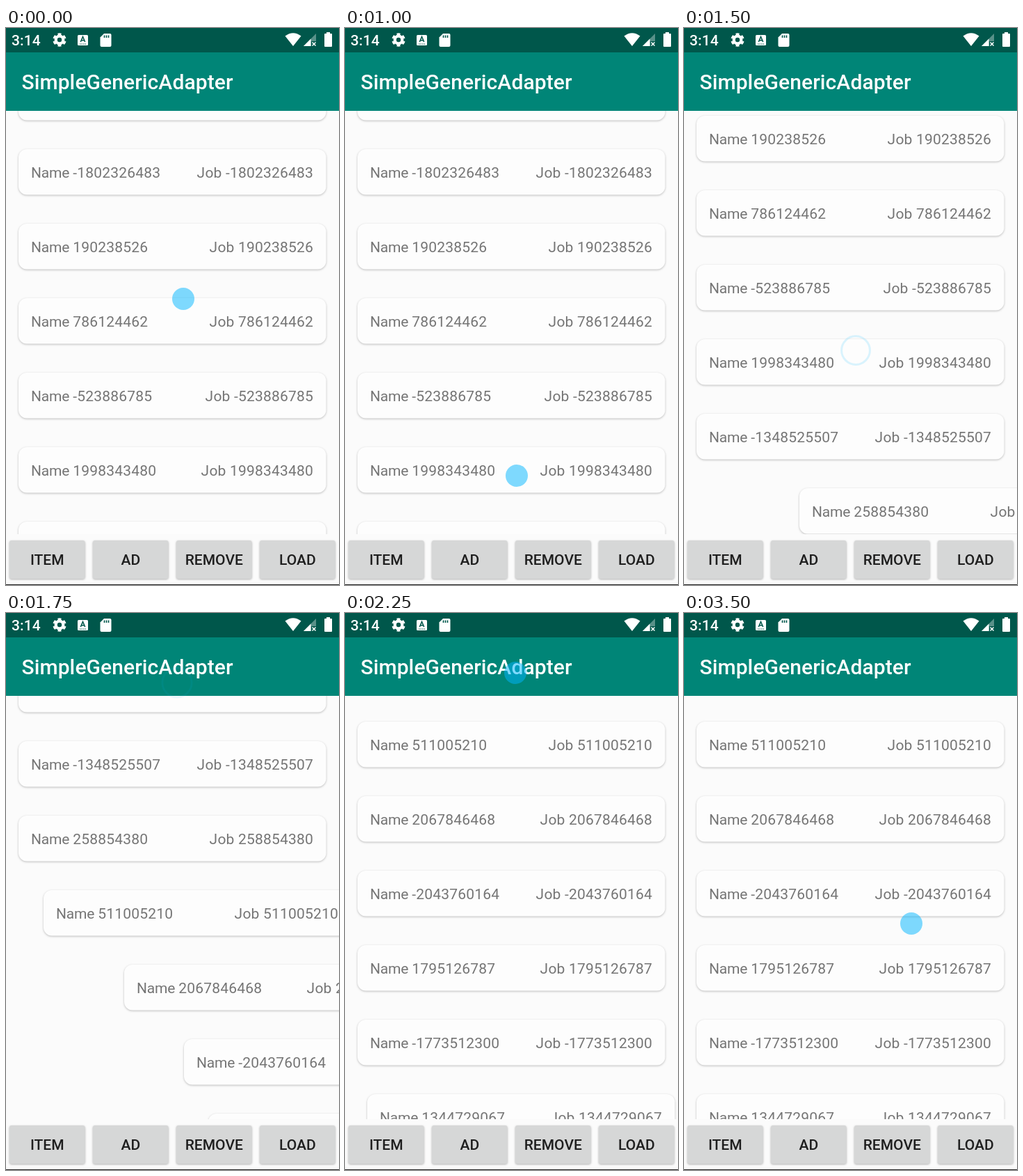
Recreate the animation shown at these times as an HTML page. Size 479 by 800 pixels, loop 3.75 s.

```html
<!DOCTYPE html>
<html lang="en">
<head>
<meta charset="utf-8">
<title>Adapter list</title>
<style>
  html, body { margin: 0; width: 100%; height: 100%; overflow: hidden; background: #fbfbfb; }
  svg { display: block; width: 100%; height: 100%; font-family: Roboto, sans-serif; font-size: 21px; }
  .card rect { fill: #fdfdfd; filter: drop-shadow(0 1px 1.5px rgba(0, 0, 0, .25)); }
  .card text { fill: #757575; letter-spacing: .2px; }
  .card .name { letter-spacing: -.2px; }
  .button rect { fill: #d6d7d7; filter: drop-shadow(0 1px 1.5px rgba(0, 0, 0, .3)); }
  .button text { fill: #1f1f1f; font-weight: 500; text-anchor: middle; }
  .bar text { fill: #fff; font-weight: 500; letter-spacing: .08px; }
</style>
</head>
<body>
<svg viewBox="0 0 479 800" xmlns="http://www.w3.org/2000/svg">
  <defs>
    <clipPath id="listClip"><rect y="119" width="479" height="608"/></clipPath>
  </defs>
  <rect width="479" height="800" fill="#fbfbfb"/>
  <g clip-path="url(#listClip)"><g id="list"></g></g>
  <g id="buttons"></g>
  <rect y="799" width="479" height="1" fill="#222"/>

  <g class="bar">
    <rect width="479" height="35" fill="#00574b"/>
    <rect y="35" width="479" height="84" fill="#008577"/>
    <text x="22.5" y="88" font-size="30">SimpleGenericAdapter</text>
    <text x="8" y="25">3:14</text>

    <g fill="none" stroke="#fff">
      <circle cx="77" cy="17" r="5.3" stroke-width="4.2"/>
      <circle cx="77" cy="17" r="8.2" stroke-width="3" pathLength="36" stroke-dasharray="3.4 2.6" stroke-dashoffset="-1.3"/>
    </g>
    <rect x="103" y="10" width="15" height="15" rx="1.5" fill="#fff"/>
    <path d="M107.300 20L110.500 12.500L113.700 20M108.500 17.700H112.500" fill="none" stroke="#00574b" stroke-width="1.6"/>
    <path d="M106 23H115" stroke="#00574b" stroke-dasharray="1.5 1"/>
    <path d="M141 8H149.500Q151.500 8 151.500 10V25Q151.500 27 149.500 27H137.500Q135.500 27 135.500 25V13.500Z" fill="#fff"/>
    <path d="M141.500 10.500V14M144.500 10.500V14M147.500 10.500V14" stroke="#00574b" stroke-width="1.6"/>

    <path d="M413 26L401.500 11.500Q413 3 424.500 11.500Z" fill="#fff"/>
    <path d="M428 26L446 8V19H439V26Z" fill="#fff" opacity=".35"/>
    <path d="M428 26L438.500 15.500V26Z" fill="#fff"/>
    <path d="M440.500 20.500L445.500 25.500M445.500 20.500L440.500 25.500" stroke="#fff" stroke-width="1.5"/>
    <path d="M461 6H466V8H468Q469 8 469 9V26Q469 27 468 27H459Q458 27 458 26V9Q458 8 459 8H461Z" fill="#fff"/>
  </g>
  <circle id="pointer"/>
</svg>
<script>
const LOOP = 3750, STEP = 250;
const PITCH = 107, FIRST_TOP = 67, LIST_BOTTOM = 727, CARD_MARGIN = 21;
const SLIDE = 300, SLIDE_FROM = 275;
const drag = { start: 1250, from: 52, to: 525, power: 2.2 };
const fling = { start: 1750, to: 767, power: 2.17 };
const PHASE = 500; // length of the drag and of the fling
const svgNS = 'http://www.w3.org/2000/svg';

const ids = (' -1802326483 190238526 786124462 -523886785 1998343480 -1348525507 258854380 ' +
  '511005210 2067846468 -2043760164 1795126787 -1773512300 1344729067').split(' ');

// pointer stops: time, x, y
const stops = [
  [0, 255, 389], [500, 255, 464], [750, 245, 631], [1000, 247, 643], [1250, 250, 566],
  [1750, 246, 100], [2250, 245, 86], [2750, 329, 447], [3000, 329, 447], [3500, 327, 446]
];
const presses = [[260, 1000], [1250, 2000]];

const list = document.getElementById('list');
const buttons = document.getElementById('buttons');
const pointer = document.getElementById('pointer');

const clamp = u => Math.min(1, Math.max(0, u));
const mix = (a, b, u) => a + (b - a) * u;

function set(el, attrs) {
  for (const key in attrs) el.setAttribute(key, attrs[key]);
}

function add(parent, tag, attrs, text = '') {
  const el = document.createElementNS(svgNS, tag);
  set(el, attrs);
  el.textContent = text;
  return parent.appendChild(el);
}

const cards = ids.map(id => {
  const card = add(list, 'g', { class: 'card' });
  add(card, 'rect', { x: 18, width: 442.5, height: 65.5, rx: 12 });
  const label = add(card, 'text', { x: 36, y: 41 });
  add(label, 'tspan', { class: 'name' }, 'Name ');
  add(label, 'tspan', {}, id);
  add(card, 'text', { x: 442, y: 41, 'text-anchor': 'end' }, 'Job ' + id);
  return card;
});

['ITEM', 'AD', 'REMOVE', 'LOAD'].forEach((label, i) => {
  const button = add(buttons, 'g', { class: 'button', transform: `translate(${5 + i * 120} 736)` });
  add(button, 'rect', { width: 108.5, height: 55, rx: 3 });
  add(button, 'text', { x: 54.3, y: 35 }, label);
});

// the drag speeds up, the fling slows down
function scrollAt(t) {
  if (t < drag.start) return 0;
  if (t < fling.start) return mix(drag.from, drag.to, ((t - drag.start) / PHASE) ** drag.power);
  return mix(fling.to, drag.to, clamp(1 - (t - fling.start) / PHASE) ** fling.power);
}

// inverse of scrollAt: when the list reaches a given offset
function timeOf(scroll) {
  if (scroll <= drag.from) return -SLIDE;
  if (scroll < drag.to) {
    const part = (scroll - drag.from) / (drag.to - drag.from);
    return drag.start + PHASE * part ** (1 / drag.power);
  }
  const left = (fling.to - scroll) / (fling.to - drag.to);
  return fling.start + PHASE * (1 - left ** (1 / fling.power));
}

const entries = ids.map((_, i) => timeOf(FIRST_TOP + i * PITCH - CARD_MARGIN - LIST_BOTTOM));

// a card slides in from the right once it reaches the list's lower edge
function slideAt(i, t) {
  const u = clamp((t - entries[i]) / SLIDE);
  return SLIDE_FROM * (1 + Math.cos(Math.PI * u)) / 2;
}

function pointerAt(t) {
  const next = stops.findIndex(stop => stop[0] > t);
  if (next < 0) return stops[stops.length - 1].slice(1);
  const [t0, x0, y0] = stops[next - 1], [t1, x1, y1] = stops[next];
  const u = 1 - (1 - (t - t0) / (t1 - t0)) ** 2;
  const held = t >= drag.start && t < fling.start;
  return [mix(x0, x1, u), held ? y0 + drag.from - scrollAt(t) : mix(y0, y1, u)];
}

// a press turns the dot into a ring that widens and fades
function drawPointer(t) {
  const [cx, cy] = pointerAt(t).map(Math.round);
  const press = presses.find(([from, to]) => t >= from && t < to);
  const fade = press ? Math.exp((press[0] - t) / 440) : 1;
  const color = `rgba(0,181,255,${press ? .25 * fade : .5})`;
  set(pointer, {
    cx, cy, r: press ? 22 - 2.8 * fade : 16,
    fill: press ? 'none' : color, stroke: press ? color : 'none', 'stroke-width': 3
  });
}

function draw(now) {
  const t = Math.floor(now % LOOP / STEP) * STEP;
  const scroll = scrollAt(t);
  cards.forEach((card, i) => {
    const x = Math.round(slideAt(i, t));
    const y = Math.round(FIRST_TOP + i * PITCH - scroll);
    card.setAttribute('transform', `translate(${x} ${y})`);
  });
  drawPointer(t);
}

const start = performance.now();
function tick() {
  draw(performance.now() - start);
  requestAnimationFrame(tick);
}
tick();
</script>
</body>
</html>
```
